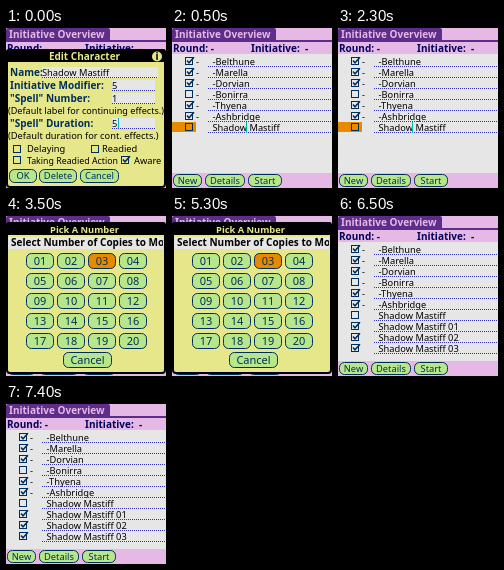
An HTML page for the animation above (8 s loop, 160 px wide and 160 px high).

```html
<!DOCTYPE html>
<html lang="en">
<head>
<meta charset="utf-8">
<title>Initiative Overview</title>
<style>
html, body { margin: 0; width: 100%; height: 100%; overflow: hidden; }
svg { display: block; width: 100vw; height: 100vh; }
text {
  font-family: "Noto Sans", "Open Sans", sans-serif;
  font-size: 9.3px;
  font-variant-ligatures: none;
  white-space: pre;
}
.b { font-weight: bold; font-size: 10px; }
</style>
</head>
<body>
<svg id="stage" viewBox="0 0 160 160" xmlns="http://www.w3.org/2000/svg"></svg>
<script>
const LOOP = 8000;
const CUTS = [0, 500, 3500, 6500];
const C = {
  form: '#e6b8e6', list: '#e6e6e6', purple: '#5c2e8a', ink: '#00005c',
  dialog: '#e6e68a', button: '#b8e68a', edge: '#002e5c',
  line: '#2e2eb8', orange: '#e68a00', caret: '#00b8b8'
};

const rect = (x, y, w, h, fill) =>
  `<rect x="${x}" y="${y}" width="${w}" height="${h}" fill="${fill}"/>`;

const text = (x, y, str, { bold, size, fill = '#000', mid } = {}) =>
  `<text x="${x}" y="${y}" fill="${fill}"${bold ? ' class="b"' : ''}` +
  `${size ? ` style="font-size:${size}px"` : ''}${mid ? ' text-anchor="middle"' : ''}>${str}</text>`;

const dots = (x, y, end) =>
  `<path d="M${x} ${y + .5}H${end}" stroke="${C.line}" stroke-dasharray="1 1" shape-rendering="crispEdges"/>`;

const check = (x, y, on) =>
  `<rect x="${x + .5}" y="${y + .5}" width="7" height="7" fill="none" stroke="${C.edge}"/>` +
  (on ? `<path d="M${x + 2} ${y + 3.5}l2 2.3l5 -5.5" fill="none" stroke="${C.edge}" stroke-width="1.5"/>` : '');

const button = (x, y, w, h, label, { fill = C.button, size = 9.3 } = {}) =>
  `<rect x="${x + .5}" y="${y + .5}" width="${w - 1}" height="${h - 1}" rx="5" fill="${fill}" stroke="${C.edge}"/>` +
  text(x + w / 2, y + h / 2 + size * .36, label, { mid: true, size, fill: C.edge });

const dialog = (y, h, title, size) =>
  `<rect x="1" y="${y + 1}" width="158" height="${h - 2}" rx="3" fill="${C.dialog}" stroke="#000" stroke-width="2"/>` +
  `<path d="M0 ${y + 13}V${y + 3}q0 -3 3 -3H157q3 0 3 3V${y + 13}z"/>` +
  text(78.5, y + 11, title, { bold: true, size, fill: C.dialog, mid: true });

const party = [
  ['-Belthune', 1], ['-Marella', 1], ['-Dorvian', 1], ['-Bonirra', 0],
  ['-Thyena', 1], ['-Ashbridge', 1], ['Shadow Mastiff', 0]
];
const copies = [1, 2, 3].map(n => ['Shadow Mastiff 0' + n, 1]);

function row([name, on], i) {
  const y = 37 + i * 11;
  return check(13, y - 8, on) +
    (name[0] === '-' ? text(24, y, '-') : '') +
    text(40.5, y, name) + dots(36, y + 1, 160);
}

function overview(rows, picked) {
  const top = 28 + picked * 11;
  const mark = picked == null ? '' : rect(0, top, 24, 10, C.orange);
  const caret = picked == null ? '' : rect(74, top, 1, 11, C.caret);
  const head = { bold: true, fill: C.ink };
  return rect(0, 0, 160, 160, C.form) +
    rect(0, 26, 160, 119, C.list) +
    `<path d="M0 13V2q0 -2 2 -2H102q2 0 2 2V13z" fill="${C.purple}"/>` +
    rect(0, 12, 160, 2, C.purple) +
    text(3, 10, 'Initiative Overview', { bold: true, fill: C.form }) +
    text(1, 24, 'Round: -', head) +
    text(79, 24, 'Initiative:', head) + text(133, 24, '-', head) +
    mark + rows.map(row).join('') + caret +
    button(1, 146, 29, 13, 'New') +
    button(33, 146, 40, 13, 'Details') +
    button(76, 146, 34, 13, 'Start');
}

function editor() {
  const field = (label, y, x, end, value) =>
    text(4, y, label, { bold: true, fill: C.edge }) +
    rect(x, y - 9, end - x, 11, C.list) +
    text(x, y, value) + dots(x, y + 1, end);
  const number = (label, y, value) => field(label, y, 106, 149, value);
  return dialog(21, 139, 'Edit Character', 10) +
    `<circle cx="151" cy="28.5" r="5" fill="${C.dialog}"/>` +
    text(151, 32, 'i', { bold: true, mid: true }) +
    field('Name:', 48, 36, 152, 'Shadow Mastiff') +
    number('Initiative Modifier:', 61, '5') +
    number('"Spell" Number:', 74, '1') +
    text(2, 86, '(Default label for continuing effects.)', { size: 9.1 }) +
    number('"Spell" Duration:', 99, '5') +
    rect(112, 90, 1, 10, C.caret) +
    text(2, 111, '(Default duration for cont. effects.)') +
    check(7, 117, 0) + text(21, 124, 'Delaying') +
    check(85, 117, 0) + text(96, 124, 'Readied') +
    check(7, 128, 0) + text(21, 136, 'Taking Readied Action', { size: 8.8 }) +
    check(115, 128, 1) + text(128, 136, 'Aware') +
    button(3, 141, 28, 14, 'OK') +
    button(33, 141, 38, 14, 'Delete') +
    button(74, 141, 39, 14, 'Cancel');
}

function picker() {
  let out = dialog(6, 152, 'Pick A Number', 9.3) +
    rect(2, 21, 155, 12, C.list) +
    `<svg width="157" height="160">${text(5, 30, 'Select Number of Copies to Mo', { bold: true })}</svg>`;
  for (let n = 1; n <= 20; n++) {
    const col = (n - 1) % 4, line = Math.floor((n - 1) / 4);
    out += button(20 + col * 31, 37 + line * 20, 28, 16, String(n).padStart(2, '0'),
      { fill: n === 3 ? C.orange : C.button, size: 11 });
  }
  return out + button(57, 136, 49, 16, 'Cancel', { size: 11 });
}

const list = overview(party, 6);
const scenes = [
  overview(party) + editor(),
  list,
  list + picker(),
  overview(party.concat(copies))
];

const stage = document.getElementById('stage');
stage.innerHTML = scenes.map(s => `<g display="none">${s}</g>`).join('');
const groups = [...stage.children];

function draw(ms) {
  const t = ms % LOOP;
  const now = CUTS.filter(c => c <= t).length - 1;
  groups.forEach((g, i) => g.setAttribute('display', i === now ? 'inline' : 'none'));
}

const start = performance.now();
function tick() {
  draw(performance.now() - start);
  requestAnimationFrame(tick);
}
tick();
</script>
</body>
</html>
```
